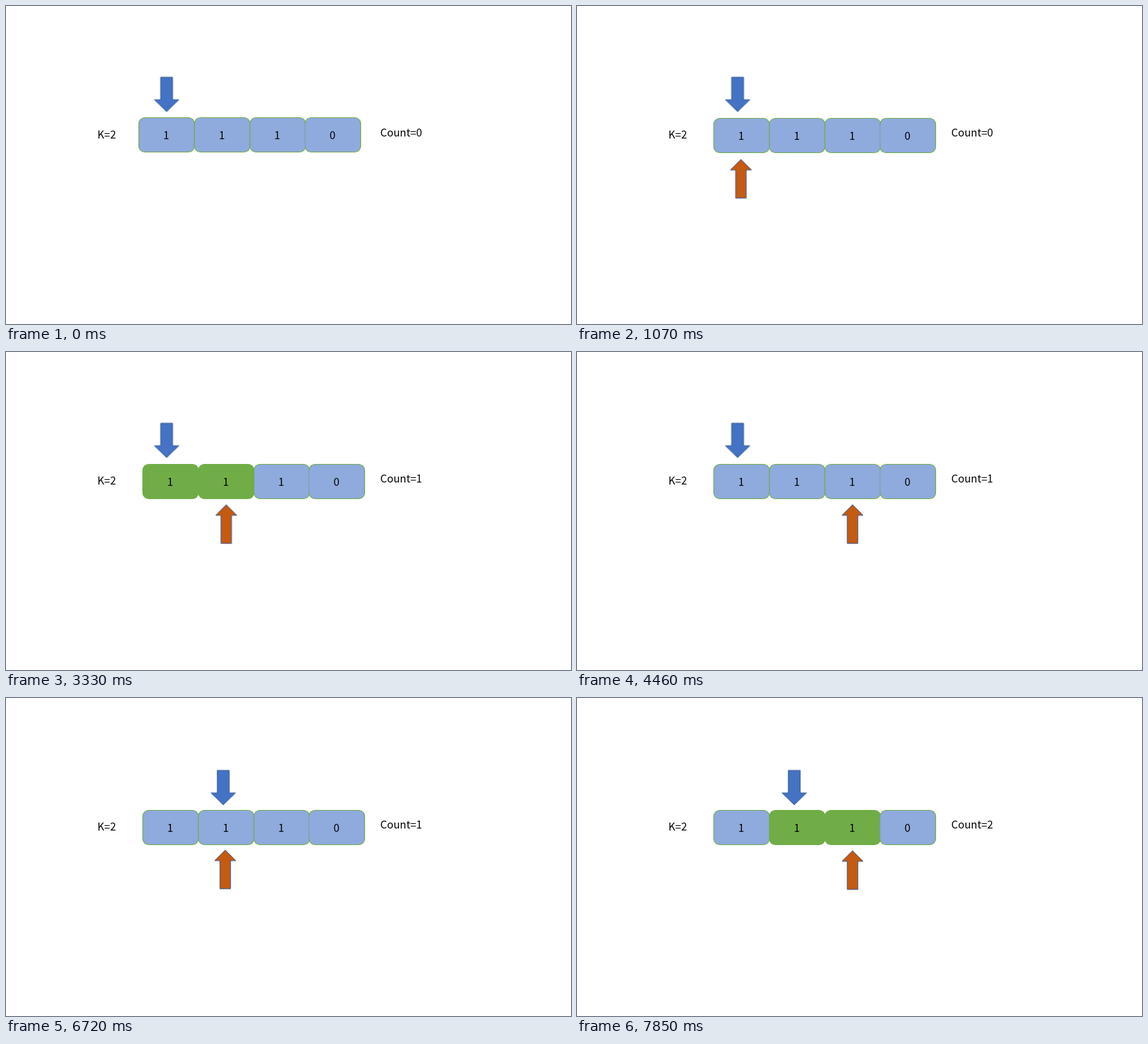
Recreate the animation shown at these times as an HTML page. Size 853 px wide and 480 px high, loop 8000 ms.

```html
<!DOCTYPE html>
<html lang="en">
<head>
<meta charset="utf-8">
<title>Subarray sum</title>
<style>
html, body { margin: 0; width: 100%; height: 100%; overflow: hidden; background: #fff; }
svg { display: block; width: 853px; height: 480px; }
text { font: 300 16px "Noto Sans CJK SC", "Noto Sans CJK JP", "Open Sans", sans-serif; fill: #000; }
.cells text { text-anchor: middle; }
.cells rect { width: 84px; height: 52px; rx: 9px; fill: #8faadc; stroke: #70ad47; stroke-width: 1.2; }
.seam { stroke: #7f9fb8; }
.arrow { stroke: #2f528f; stroke-width: 1; }
.start { fill: #4472c4; }
.end { fill: #c55a11; }

/* Every change is a hard cut. */
.cells, .cells rect, .arrow, .count { animation: 8s step-end infinite; }
.cells { animation-name: row; }
.start { animation-name: start; }
.end { animation-name: end; }
.cells .first { animation-name: first; }
.cells .second { animation-name: second; }
.cells .third { animation-name: third; }
.zero { animation-name: zero; }
.one { animation-name: one; }
.two { animation-name: two; }

@keyframes row {
  0% { transform: none; }
  13.375%, 100% { transform: translate(6px, 1px); }
}
@keyframes start {
  0% { transform: translate(242.5px, 159.5px); }
  69.875%, 100% { transform: translate(328px, 161.3px); }
}
@keyframes end {
  0% { transform: translate(247.5px, 231.5px); visibility: hidden; }
  13.375% { transform: translate(247.5px, 231.5px); visibility: visible; }
  27.5% { transform: translate(332.5px, 230.5px); visibility: visible; }
  55.75% { transform: translate(416px, 230.5px); visibility: visible; }
  69.875% { transform: translate(416px, 230.5px); visibility: hidden; }
  84% { transform: translate(331px, 229.5px); visibility: visible; }
  98.125%, 100% { transform: translate(416px, 230.5px); visibility: visible; }
}
@keyframes first {
  0%, 55.75%, 100% { fill: #8faadc; }
  41.625% { fill: #70ad47; }
}
@keyframes second {
  0%, 55.75% { fill: #8faadc; }
  41.625%, 98.125%, 100% { fill: #70ad47; }
}
@keyframes third {
  0% { fill: #8faadc; }
  98.125%, 100% { fill: #70ad47; }
}
@keyframes zero {
  0% { visibility: visible; }
  41.625%, 100% { visibility: hidden; }
}
@keyframes one {
  0%, 98.125%, 100% { visibility: hidden; }
  41.625% { visibility: visible; }
}
@keyframes two {
  0% { visibility: hidden; }
  98.125%, 100% { visibility: visible; }
}
</style>
</head>
<body>
<svg viewBox="0 0 853 480">
  <text x="138" y="200">K=2</text>
  <g class="cells">
    <rect class="first" x="200.5" y="168.5"/>
    <rect class="second" x="284.5" y="168.5"/>
    <rect class="third" x="368.3" y="168.5"/>
    <rect x="451.5" y="168.5"/>
    <path class="seam" d="M451.5 178V211"/>
    <text x="242" y="200.5">1</text>
    <text x="326" y="200.5">1</text>
    <text x="409.5" y="200.5">1</text>
    <text x="493" y="200.5">0</text>
  </g>
  <path class="arrow start" d="M0 0L-18.5-18H-9V-52H9V-18H18.5Z"/>
  <path class="arrow end" d="M0 0L16 16H8V58.5H-8V16H-16Z"/>
  <text class="count zero" x="565" y="197">Count=0</text>
  <text class="count one" x="565" y="197">Count=1</text>
  <text class="count two" x="565" y="197">Count=2</text>
</svg>
</body>
</html>
```
